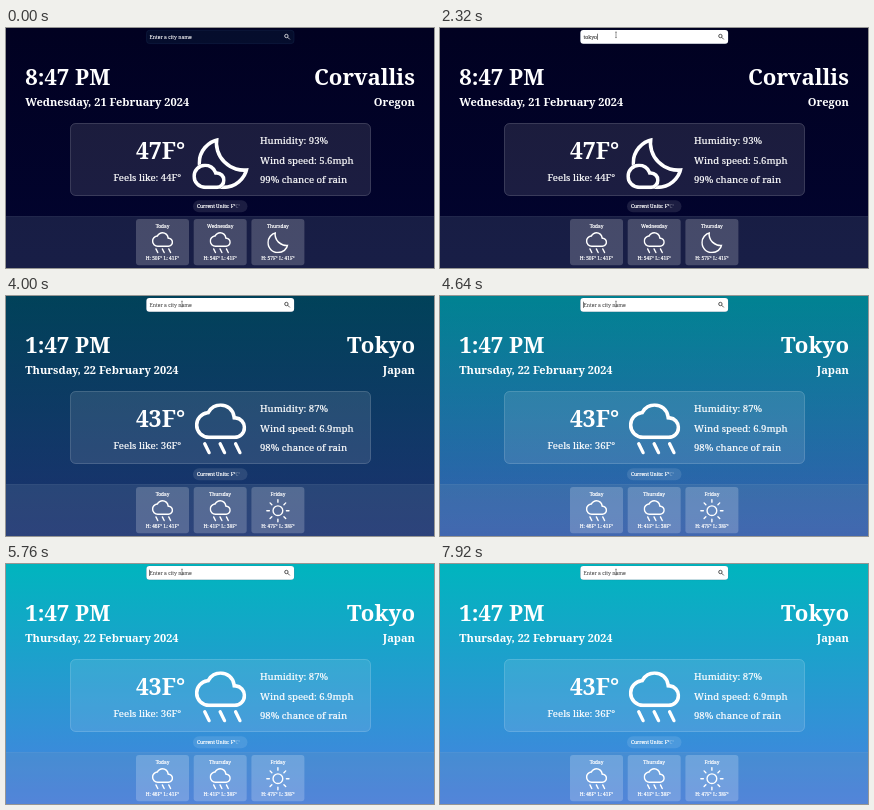
These frames come from a looping animation (428x240 px, 8 s). An HTML page:

```html
<!DOCTYPE html>
<html lang="en">
<head>
<meta charset="utf-8">
<title>Weather search</title>
<style>
  html, body { margin: 0; width: 100%; height: 100%; overflow: hidden; background: #010122; }
  svg { display: block; }
  #stage { width: 100vw; height: 100vh; }
  text { font-family: "Noto Serif", "Droid Serif", serif; font-size: 9.6px; fill: #fff; stroke: #fff; stroke-width: .2px; white-space: pre; }
  .big { font-size: 22.2px; font-weight: 700; stroke: none; }
  .mid { font-size: 11.08px; font-weight: 700; stroke: none; }
  .temp { font-size: 23px; font-weight: 700; stroke: none; }
  .small { font-size: 4.8px; }
  .query { font-size: 5.05px; stroke-width: .1px; }
  .end { text-anchor: end; }
  .center { text-anchor: middle; }
  /* Half of the stroke is clipped away, so the outline lies inside the shape. */
  .line { fill: none; stroke: #fff; stroke-width: 112; }
  .ray { fill: none; stroke: #fff; stroke-width: 52; stroke-linecap: round; }
</style>
</head>
<body>
<svg id="stage" viewBox="0 0 428 240" preserveAspectRatio="none">
  <defs>
    <linearGradient id="night" x2="0" y2="1">
      <stop stop-color="#010121"/><stop offset="1" stop-color="#020430"/>
    </linearGradient>
    <linearGradient id="day" x2="0" y2="1">
      <stop stop-color="#00b5be"/><stop offset="1" stop-color="#4a80e2"/>
    </linearGradient>

    <path id="cloud" d="M300-320q-91 0-155.500-64.500T80-540q0-83 55-145t136-73q32-57 87.500-89.500T480-880q90 0 156.500 57.500T717-679q69 6 116 57t47 122q0 75-52.500 127.500T700-320Z"/>
    <path id="puff" d="M240-40q-83 0-141.500-58.500T40-240q0-83 58.500-141.500T240-440q60 0 109.500 32.500T423-320q57 2 97 42.500t40 97.500q0 58-41 99t-99 41Z"/>
    <path id="crescent" d="M484-80q-84 0-157.500-32t-128-86.500Q144-253 112-326.500T80-484q0-146 93-257.500T410-880q-18 99 11 193.500T521-521q71 71 165.500 100T880-410q-26 144-138 237T484-80Z"/>
    <clipPath id="inCloud"><use href="#cloud"/></clipPath>
    <clipPath id="inPuff"><use href="#puff"/></clipPath>
    <clipPath id="inCrescent"><use href="#crescent"/></clipPath>
    <mask id="behindPuff" maskUnits="userSpaceOnUse" x="0" y="-960" width="960" height="960">
      <rect y="-960" width="960" height="960" fill="#fff"/>
      <use href="#puff" fill="#000"/>
    </mask>

    <symbol id="rain" viewBox="0 -960 960 960">
      <use href="#cloud" class="line" clip-path="url(#inCloud)"/>
      <path class="ray" d="M234-248l68 138M474-248l68 138M714-248l68 138"/>
    </symbol>
    <symbol id="moon" viewBox="0 -960 960 960">
      <use href="#crescent" class="line" clip-path="url(#inCrescent)"/>
    </symbol>
    <symbol id="cloudyNight" viewBox="0 -960 960 960">
      <g mask="url(#behindPuff)">
        <g transform="translate(40 40)"><use href="#crescent" class="line" clip-path="url(#inCrescent)"/></g>
      </g>
      <use href="#puff" class="line" clip-path="url(#inPuff)"/>
    </symbol>
    <symbol id="sun" viewBox="0 -960 960 960">
      <circle class="ray" cx="480" cy="-480" r="182"/>
      <path id="cross" class="ray" d="M480-895v95M480-160v95M65-480h95M800-480h95"/>
      <use href="#cross" transform="rotate(45 480 -480)"/>
    </symbol>
  </defs>

  <rect width="428" height="240" fill="url(#day)"/>
  <rect id="nightSky" width="428" height="240" fill="url(#night)"/>

  <rect x="140.500" y="2.300" width="147.500" height="13.300" rx="3" fill="#0a1a38" fill-opacity=".5" stroke="#1b3358" stroke-opacity=".7" stroke-width=".5"/>
  <rect id="field" x="140.400" y="2.100" width="147.700" height="13.700" rx="3" fill="#fff"/>
  <text id="query" class="query" x="143.500" y="10.700"></text>
  <rect id="caret" y="5.700" width=".6" height="6.200" fill="#222"/>
  <g id="lens" fill="none" stroke-width=".75"><circle cx="280.400" cy="8" r="1.700"/><path d="M281.600 9.200l2.200 2.200"/></g>
  <path id="pointer" d="M-1-2.800h.7l.3.400.3-.4h.7M0-2.400v4.800M-1 2.800h.7l.3-.4.3.4h.7" fill="none" stroke="#333" stroke-width=".5"/>

  <text id="time" class="big" x="19.300" y="57"></text>
  <text id="date" class="mid" x="19.300" y="77.500"></text>
  <text id="city" class="big end" x="409" y="57"></text>
  <text id="region" class="mid end" x="409" y="77.500"></text>

  <rect x="64.500" y="95.500" width="300" height="72" rx="5" fill="#fff" fill-opacity=".1" stroke="#fff" stroke-opacity=".18"/>
  <text id="temp" class="temp end" x="179.200" y="131"></text>
  <text id="feels" class="end" x="175" y="153"></text>
  <use id="icon" x="183.700" y="102" width="61.700" height="61.700"/>
  <text id="humidity" x="254" y="116.300"></text>
  <text id="wind" x="254" y="135.600"></text>
  <text id="chance" x="254" y="154.800"></text>

  <rect x="187" y="172.200" width="54.500" height="12" rx="6" fill="#fff" fill-opacity=".1"/>
  <text class="small" x="191" y="179.900">Current Units: F°<tspan opacity=".65" fill-opacity=".65" stroke="none">C°</tspan></text>

  <rect y="188" width="428" height="52" fill="#7896aa" fill-opacity=".18"/>
  <rect y="188" width="428" height=".5" fill="#fff" fill-opacity=".08"/>
  <g id="cards"></g>
</svg>
<script>
const LOOP = 8000, REPLY = 3040, FOCUS = 400;
const WORD = 'tokyo', KEYS = [1040, 1200, 1360, 1600, 1840];
const FADE = [[REPLY, 0], [3360, .07], [4000, .36], [4640, .72], [4960, .89], [5360, 1]];

const views = [
  {
    text: {
      time: '8:47 PM', date: 'Wednesday, 21 February 2024', city: 'Corvallis', region: 'Oregon',
      temp: '47F°', feels: 'Feels like: 44F°',
      humidity: 'Humidity: 93%', wind: 'Wind speed: 5.6mph', chance: '99% chance of rain'
    },
    icon: 'cloudyNight',
    days: [['Today', 'rain', 50, 41], ['Wednesday', 'rain', 54, 41], ['Thursday', 'moon', 57, 41]]
  },
  {
    text: {
      time: '1:47 PM', date: 'Thursday, 22 February 2024', city: 'Tokyo', region: 'Japan',
      temp: '43F°', feels: 'Feels like: 36F°',
      humidity: 'Humidity: 87%', wind: 'Wind speed: 6.9mph', chance: '98% chance of rain'
    },
    icon: 'rain',
    days: [['Today', 'rain', 46, 41], ['Thursday', 'rain', 41, 38], ['Friday', 'sun', 47, 38]]
  }
];

const $ = id => document.getElementById(id);
const set = (id, name, value) => $(id).setAttribute(name, value);
const clamp = v => Math.max(0, Math.min(1, v));

function along(steps, t) {
  if (t <= steps[0][0]) return steps[0][1];
  for (let i = 1; i < steps.length; i++) {
    const [t0, a] = steps[i - 1], [t1, b] = steps[i];
    if (t < t1) return a + (b - a) * (t - t0) / (t1 - t0);
  }
  return steps[steps.length - 1][1];
}

function card([day, icon, high, low], i) {
  const x = 130 + i * 57.7, mid = x + 26.5;
  return `<rect x="${x}" y="191" width="53" height="46.300" rx="3" fill="#fff" fill-opacity=".2"/>
    <text class="small center" x="${mid}" y="199.800">${day}</text>
    <use href="#${icon}" x="${mid - 12.8}" y="201.900" width="25.600" height="25.600"/>
    <text class="small center" x="${mid}" y="232">H: ${high}F° L: ${low}F°</text>`;
}

let shown = -1;
function show(n) {
  if (n === shown) return;
  shown = n;
  const view = views[n];
  for (const id in view.text) $(id).textContent = view.text[id];
  set('icon', 'href', '#' + view.icon);
  $('cards').innerHTML = view.days.map(card).join('');
}

// The caret stays lit for half a second after focus or a key, then blinks.
function caretOn(t) {
  const last = t >= REPLY ? 3400 : [FOCUS, ...KEYS].filter(k => k <= t).pop();
  return t >= FOCUS && (t < last || Math.floor((t - last) / 500) % 2 === 0);
}

function draw(t) {
  show(t < REPLY ? 0 : 1);
  set('nightSky', 'opacity', 1 - along(FADE, t));

  const white = clamp((t - FOCUS) / 200);
  const typed = t < REPLY ? KEYS.filter(k => k <= t).length : 0;
  const query = $('query');
  const value = typed ? WORD.slice(0, typed) : 'Enter a city name';
  if (query.textContent !== value) query.textContent = value;
  query.style.fill = query.style.stroke = white < .5 ? '#fff' : typed ? '#333' : '#555';
  set('field', 'opacity', white);
  set('lens', 'stroke', white < .5 ? '#fff' : '#222');

  set('caret', 'x', 143.4 + (typed ? query.getComputedTextLength() + .3 : 0));
  set('caret', 'opacity', caretOn(t) ? 1 : 0);
  set('pointer', 'transform', `translate(176 ${t < REPLY ? 6.8 : 8})`);
  set('pointer', 'opacity', t < FOCUS ? 0 : 1);
}

const start = performance.now();
function tick() {
  draw((performance.now() - start) % LOOP);
  requestAnimationFrame(tick);
}
tick();
</script>
</body>
</html>
```
